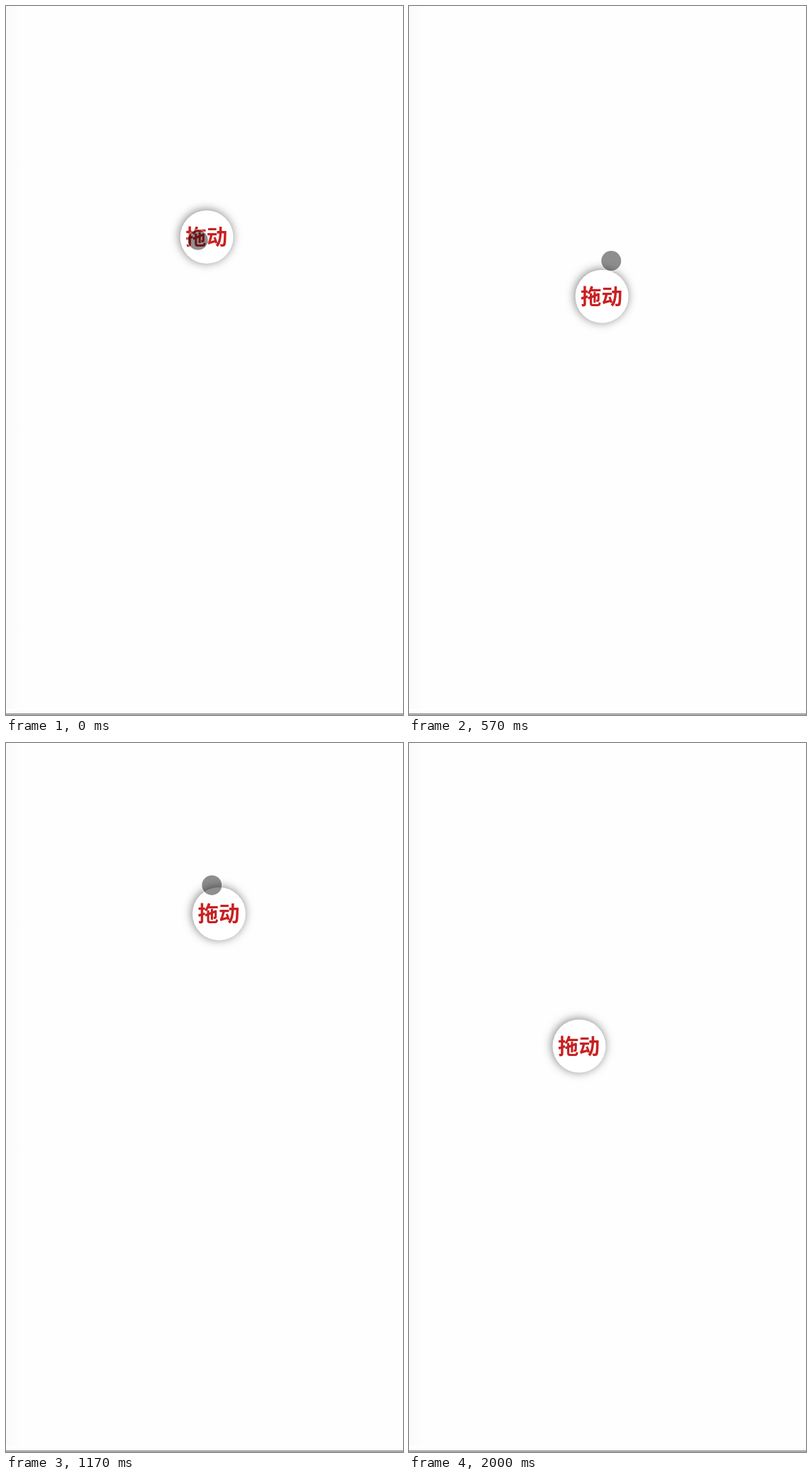
Animation, 560 px wide and 999 px high, one loop 2.61 s. Source, as an HTML page:

```html
<!DOCTYPE html>
<html lang="zh-CN">
<head>
<meta charset="utf-8">
<title>拖动</title>
<style>
  html, body { margin: 0; width: 100%; height: 100%; overflow: hidden; background: #fefefe; }
  .stage { position: relative; width: 560px; height: 999px; overflow: hidden; }
  .edge { position: absolute; left: 0; top: 0; width: 20px; height: 990px;
    background: linear-gradient(90deg, #fafafa, #fbfbfb 30%, #fefefe); }
  .line { position: absolute; left: 0; top: 997px; width: 560px; height: 1px;
    background: #686868; box-shadow: 0 1px #d8d8d8; }
  .ball, .touch { position: absolute; left: 0; top: 0; border-radius: 50%; }
  .ball { width: 75px; height: 75px; margin: -37.5px; background: #fff;
    box-shadow: -1px -1px 13px rgba(0, 0, 0, .5);
    font: 700 29.5px/71px "Noto Sans CJK SC", "Noto Sans CJK", sans-serif;
    color: #c82022; text-align: center; white-space: nowrap; }
  .touch { width: 28px; height: 28px; margin: -14px; background: rgba(0, 0, 0, .44);
    box-shadow: 0 0 0 1.5px rgba(255, 255, 255, .4); }
</style>
</head>
<body>
<div class="stage">
  <div class="edge"></div>
  <div class="line"></div>
  <div class="ball">拖动</div>
  <div class="touch"></div>
</div>
<script>
  const LOOP = 2610, TICK = 100 / 3;
  const RELEASE = 46, GONE = 52;

  // Turning points [tick, position] of the circling touch, one list per axis
  const turnsX = [
    [-2, 287], [4, 222], [7.6, 300], [12.2, 222], [18.1, 291], [22.8, 231],
    [34.1, 300], [38.7, 195], [44, 240], [RELEASE, 239.5], [48, 231], [51, 455]
  ];
  const turnsY = [
    [-0.7, 325], [5.3, 470], [9.5, 302], [13.6, 470], [20.5, 243], [22.6, 286],
    [29.6, 430], [36, 186], [42.3, 441], [RELEASE, 426.5], [48, 437], [51, 309]
  ];

  // Sine swing from one turning point to the next
  function swing(turns, n) {
    const next = turns.findIndex(([tick]) => tick > n);
    if (next < 0) return turns[turns.length - 1][1];
    if (next === 0) return turns[0][1];
    const [t0, p0] = turns[next - 1], [t1, p1] = turns[next];
    return p0 + (p1 - p0) * (1 - Math.cos(Math.PI * (n - t0) / (t1 - t0))) / 2;
  }

  const ball = document.querySelector('.ball');
  const touch = document.querySelector('.touch');

  function place(el, n) {
    el.style.transform = `translate(${swing(turnsX, n)}px, ${swing(turnsY, n)}px)`;
  }

  function draw(now) {
    const n = Math.floor((now % LOOP + 4) / TICK);
    place(touch, n);
    place(ball, Math.min(n - 1, RELEASE)); // the ball lags one tick behind
    touch.style.visibility = n < GONE ? 'visible' : 'hidden';
  }

  const start = performance.now();
  function frame() {
    draw(performance.now() - start);
    requestAnimationFrame(frame);
  }
  frame();
</script>
</body>
</html>
```
